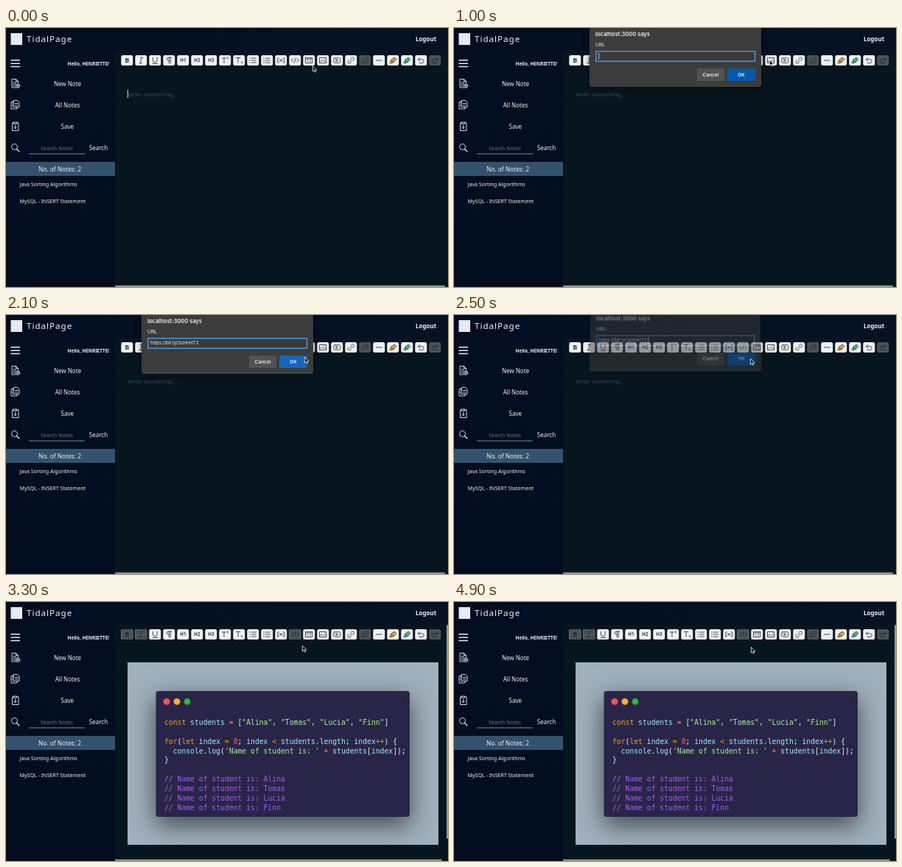
An HTML page for the animation above (5 s loop, 600 by 352 pixels).

```html
<!DOCTYPE html>
<html lang="en">
<head>
<meta charset="utf-8">
<title>Note editor</title>
<style>
html, body { margin: 0; width: 100%; height: 100%; overflow: hidden; background: #07151e; }
svg { position: absolute; left: 0; top: 0; overflow: visible; }
text { font-family: "Noto Sans", "Open Sans", sans-serif; fill: #eef1f5; white-space: pre; }
.big { font-size: 8px; }
.small { font-size: 7.1px; }
.mid { text-anchor: middle; }
.line { fill: none; stroke: #e6eaf0; stroke-width: 1; stroke-linejoin: round; stroke-linecap: round; }

.btn rect { fill: #eff0f1; }
.btn text { fill: #3a3d40; text-anchor: middle; }
.btn path { fill: none; stroke: #3a3d40; stroke-width: .9; stroke-linejoin: round; stroke-linecap: round; }
.off rect { fill: #4b5156; }
.off text { fill: #20262b; }
.off path { stroke: #20262b; }

.code text { font: 9.72px "DejaVu Sans Mono", "Noto Sans Mono", monospace; fill: #e3f0f6; }
.code .k { fill: #f89a0c; }
.code .v { fill: #9beef6; }
.code .s { fill: #a1f58f; }
.code .n { fill: #f9608a; }
.code .c { fill: #a65af0; }
.card { filter: drop-shadow(0 11px 17px rgba(0, 0, 0, .6)); }

#dialog { transform-origin: 116.5px 0; left: 184px; filter: drop-shadow(0 2px 4px rgba(0, 0, 0, .45)); }
#dialog text { font-family: Inter, "Liberation Sans", sans-serif; fill: #f1f1f1; }

/* 1% = 50 ms */
.early, .late, .caret, .typed, .wait, .hover, #dialog { animation: 5s step-end infinite; }
.early { animation-name: early; }
.late { animation-name: late; }
.caret { animation-name: caret; }
.wait { animation-name: wait; }
.typed { animation-name: typed; }
.hover { animation-name: hover; }
#dialog { animation-name: dialog; }
#cursor { animation: move 5s linear infinite; }

@keyframes early { 0% { opacity: 1 } 52%, 100% { opacity: 0 } }
@keyframes late { 0% { opacity: 0 } 52%, 100% { opacity: 1 } }
@keyframes caret { 0% { opacity: 1 } 10%, 100% { opacity: 0 } }
@keyframes wait { 0% { opacity: 1 } 28%, 100% { opacity: 0 } }
@keyframes typed { 0% { opacity: 0 } 28% { opacity: 1 } 38% { opacity: 0 } 50%, 100% { opacity: 1 } }
@keyframes hover { 0% { opacity: 0 } 36%, 100% { opacity: 1 } }
@keyframes dialog {
  0% { opacity: 0; transform: none }
  18% { opacity: .6; transform: translateY(-3.4px) scale(.985) perspective(300px) rotateX(4deg) }
  20% { opacity: 1; transform: none }
  50% { opacity: .5; transform: translateY(-3.4px) scale(.985) perspective(300px) rotateX(4deg) }
  52%, 100% { opacity: 0; transform: none }
}
@keyframes move {
  0% { transform: translate(416px, 51px) }
  4% { transform: translate(416px, 51px); animation-timing-function: steps(5) }
  14%, 30% { transform: translate(428px, 43px) }
  30% { animation-timing-function: steps(4) }
  38%, 44% { transform: translate(405px, 57px) }
  44% { animation-timing-function: steps(3) }
  50%, 89.9% { transform: translate(402px, 59px) }
  90%, 100% { transform: translate(403px, 61px) }
}
</style>
</head>
<body>
<svg width="600" height="352" viewBox="0 0 600 352">
  <defs>
    <linearGradient id="head"><stop stop-color="#030d21"/><stop offset="1" stop-color="#061224"/></linearGradient>
    <linearGradient id="side" x2="0" y2="1"><stop stop-color="#040e23"/><stop offset="1" stop-color="#030d20"/></linearGradient>
  </defs>
  <rect width="600" height="352" fill="#07151e"/>
  <rect width="600" height="31" fill="url(#head)"/>
  <rect y="31" width="148" height="321" fill="url(#side)"/>

  <rect x="6.5" y="7" width="15.5" height="16" fill="#e6eaf0"/>
  <text x="28" y="19.2" font-size="11.6" letter-spacing="1" font-weight="500">TidalPage</text>
  <text x="556" y="18" class="big" font-weight="700">Logout</text>

  <path class="line" style="stroke-width:1.5" d="M7 43.8h11.5M7 48.2h11.5M7 52.6h11.5"/>
  <text x="140" y="51" text-anchor="end" font-size="6.35" font-weight="700">Hello, HENRIETTE!</text>

  <g class="line" style="stroke-width:.9">
    <path d="M13 81H8V69.500h5.500l3 3V75M13.500 69.500v3h3M10 74h4M10 76.300h3M10 78.600h2"/>
    <circle cx="16" cy="78.700" r="2.700"/><path d="M14.600 78.700h2.800M16 77.300v2.800"/>
    <path d="M10.500 98.500h5l2.500 2.500v6.500h-7.500zM10.500 100.500H7v9.500h8v-2.500M12.300 102.500h3.700M12.300 105h3.700M8.500 103h.7M8.500 105.500h.7"/>
    <path d="M10.500 129H8.500v10.500h8.500V129h-2M10.500 128h4.500v2h-4.500zM12.700 132v4.500M11 135l1.700 1.700L14.400 135"/>
    <circle cx="11.500" cy="161.500" r="4"/><path d="M14.500 164.500l3.300 3.300" style="stroke-width:1.300"/>
  </g>
  <text x="83.500" y="78.500" class="big mid">New Note</text>
  <text x="83.500" y="107.700" class="big mid">All Notes</text>
  <text x="83.300" y="137" class="big mid">Save</text>
  <text x="69" y="165.600" class="small mid" style="fill:#6c7684">Search Notes</text>
  <path d="M31 171h76" stroke="#8d97a3" stroke-width=".9"/>
  <text x="125.500" y="166" class="big mid">Search</text>

  <rect y="182" width="148" height="19" fill="#33526d"/>
  <text x="73" y="195" class="mid" font-size="8.300">No. of Notes: 2</text>
  <text x="18.500" y="215.400" class="small">Java Sorting Algorithms</text>
  <text x="18.500" y="238" class="small">MySQL - INSERT Statement</text>

  <g id="bar"></g>

  <g class="early">
    <text x="165" y="92.500" font-size="7.800" style="fill:#34495e">Write something...</text>
    <rect class="caret" x="164.800" y="84" width="1" height="11" fill="#dfe5ea"/>
    <rect x="148" y="349.700" width="448" height="2.300" rx="1" fill="#8f9599"/>
  </g>

  <g class="late">
    <rect x="148" y="349.700" width="444" height="2.300" rx="1" fill="#8f9599"/>
    <rect x="598" y="31" width="2" height="291" rx="1" fill="#8f9599"/>
    <svg x="165" y="82" width="422" height="248" style="overflow:hidden" viewBox="165 82 422 248">
      <rect x="165" y="82" width="422" height="248" fill="#a0b0bc"/>
      <rect class="card" x="203.500" y="121" width="344.500" height="171" rx="3.500" fill="#292548"/>
    </svg>
    <circle cx="218" cy="135.300" r="4.400" fill="#fb574f"/>
    <circle cx="232" cy="135.300" r="4.400" fill="#f7b02d"/>
    <circle cx="246" cy="135.300" r="4.400" fill="#2ab83c"/>
    <g class="code" id="code"></g>
  </g>
</svg>

<svg id="dialog" width="233" height="80" viewBox="184 0 233 80">
  <path d="M184 0h233v77a3 3 0 0 1-3 3H187a3 3 0 0 1-3-3z" fill="#3c3c3c"/>
  <text x="192" y="10.800" font-size="7.500" font-weight="600">localhost:3000 says</text>
  <text x="192" y="24.800" font-size="6.700">URL</text>
  <rect x="192.700" y="31.700" width="215.800" height="13.600" fill="#3a3a3a" stroke="#5797dd" stroke-width="1.400"/>
  <rect class="wait" x="196.300" y="34" width=".8" height="8.500" fill="#eee"/>
  <g class="typed-text"><text id="url" x="196" y="40.300" font-size="6.200">https://bit.ly/3oHnHT3</text></g>
  <rect class="typed" x="263" y="34" width=".8" height="8.500" fill="#eee"/>
  <rect x="330" y="55" width="37" height="17" rx="1.500" fill="#525252"/>
  <rect x="371" y="55" width="38" height="17" rx="1.500" fill="#0459ae"/>
  <rect class="hover" x="371" y="55" width="38" height="17" rx="1.500" fill="#1565b8"/>
  <text x="348.500" y="65.500" class="mid" font-size="6.400" font-weight="600">Cancel</text>
  <text x="390" y="65.500" class="mid" font-size="6.400" font-weight="600">OK</text>
</svg>

<svg id="cursor" width="8" height="12" viewBox="0 0 8 12">
  <path d="M.4.4v7.600l1.800-1.600 1.200 2.700 1.300-.6-1.200-2.600h2.300z" fill="#0a0a0a" stroke="#f4f4f4" stroke-width=".8"/>
</svg>

<script>
const $ = id => document.getElementById(id);
const path = (d, more = "") => `<path d="${d}" ${more}/>`;
const label = (s, size, more = "") =>
  `<text y="${size * .36}" font-size="${size}" font-weight="600" ${more}>${s}</text>`;

const lines = "M-2-3h6M-2 0h6M-2 3h6";
const frame = "M-4.500-3.500h9v7h-9z";
const pen = color => path("M-4 3.500l1.500-4L2-4 4.500-1.500 1 2.500-2 3.500z", `style="fill:${color}"`) +
  path("M-2.500-.5L.8 2.500");
const undo = "M-1.500-3.500L-4-1.300-1.500 1M-4-1.300H1.500a2.300 2.300 0 0 1 0 4.800H-2";
const link = "M-1 1.300L1.300-1M-.5-2.300L1-3.600a1.900 1.900 0 0 1 2.700 2.700L2.300.6M.5 2.300L-1 3.600a1.900 1.900 0 0 1-2.700-2.700L-2.300-.6";

const icons = [
  label("B", 9),
  path("M-.8-3.800h3M-2.200 3.800h3M.8-3.800L-.8 3.800"),
  path("M-2.800-4v4a2.800 2.800 0 0 0 5.600 0v-4M-3.500 4.500h7"),
  path("M3.500-4H-.8a2.200 2.200 0 0 0 0 4.400H0M0-4v8M2-4v8"),
  label("H1", 6.200, 'style="font-weight:800"'),
  label("H2", 6.200, 'style="font-weight:800"'),
  label("H3", 6.200, 'style="font-weight:800"'),
  path("M-4-3h5.500M-1.300-3v6.500M3-4h1v2"),
  path("M-4-3.500h5.500M-1.300-3.500v6.500M3 2h1v2"),
  path(lines + "M-4.500-3h.6M-4.500 0h.6M-4.500 3h.6"),
  path(lines + "M-4.300-3.500v1M-4.300-.5v1M-4.300 2.500v1"),
  path("M-3-3h-1.500v6H-3M3-3h1.500v6H3M-1.800-.8h3.600M-1.800.9h3.600"),
  path("M-2.500-2.500L-5 0l2.500 2.500M2.500-2.500L5 0 2.500 2.500M1-3L-1 3"),
  path(frame + "M-4.500-2h9M-1.200-.6l-1.300 1.300 1.300 1.300M1.200-.6L2.500.7 1.200 2"),
  path(frame + "M-4.500 2.500L-1.500-.5.5 1.500 2 0l2.500 2.500M2-2h.3"),
  path("M-3-3.300h6a1.500 1.500 0 0 1 1.500 1.500v3.600a1.500 1.500 0 0 1-1.500 1.500h-6a1.500 1.500 0 0 1-1.500-1.500v-3.600a1.500 1.500 0 0 1 1.500-1.500zM-1-1.500L1.500 0-1 1.500z"),
  path(link),
  path(link + "M-4-2.500h1M2.500 3h1.500"),
  path("M-4 0h8"),
  pen("#f2a02c"),
  pen("#42c56b"),
  path(undo),
  path(undo, 'transform="scale(-1 1)"')
];

const button = (i, cls = "") => `<g class="btn ${cls}" transform="translate(${164.300 + i * 19} 44)">
  <rect x="-8" y="-7" width="16" height="14" rx="2.500"/>${icons[i]}</g>`;

$("bar").innerHTML = icons.map((_, i) => button(i, i === 17 || i === 22 ? "off" : "")).join("") +
  `<g class="late">${[0, 1, 12].map(i => button(i, "off")).join("")}</g>`;

// Tokens are [class, text] pairs; an empty class is plain punctuation.
const names = ["Alina", "Tomas", "Lucia", "Finn"];
const list = names.flatMap((n, i) => [["s", `"${n}"`], ["", i < 3 ? ", " : "]"]]);
const code = [
  [["k", "const "], ["v", "students "], ["k", "= "], ["", "["], ...list],
  [],
  [["k", "for"], ["", "("], ["k", "let "], ["v", "index "], ["k", "= "], ["n", "0"], ["", "; "], ["v", "index "],
    ["k", "&lt; "], ["v", "students.length"], ["", "; "], ["v", "index"], ["k", "++"], ["", ") {"]],
  [["v", "  console.log"], ["", "("], ["s", "'Name of student is: '"], ["k", " + "], ["v", "students"],
    ["", "["], ["v", "index"], ["", "]);"]],
  [["", "}"]],
  [],
  ...names.map(n => [["c", "// Name of student is: " + n]])
];
$("code").innerHTML = code.map((row, i) => `<text x="215" y="${166.600 + i * 12.970}">` +
  row.map(([c, s]) => `<tspan class="${c}">${s}</tspan>`).join("") + "</text>").join("");

// The address is pasted in one go and stays until the dialog closes.
const start = performance.now();
function tick(now) {
  const t = Math.max(0, now - start) % 5000;
  $("url").style.opacity = t >= 1400 ? 1 : 0;
  requestAnimationFrame(tick);
}
tick(start);
</script>
</body>
</html>
```
